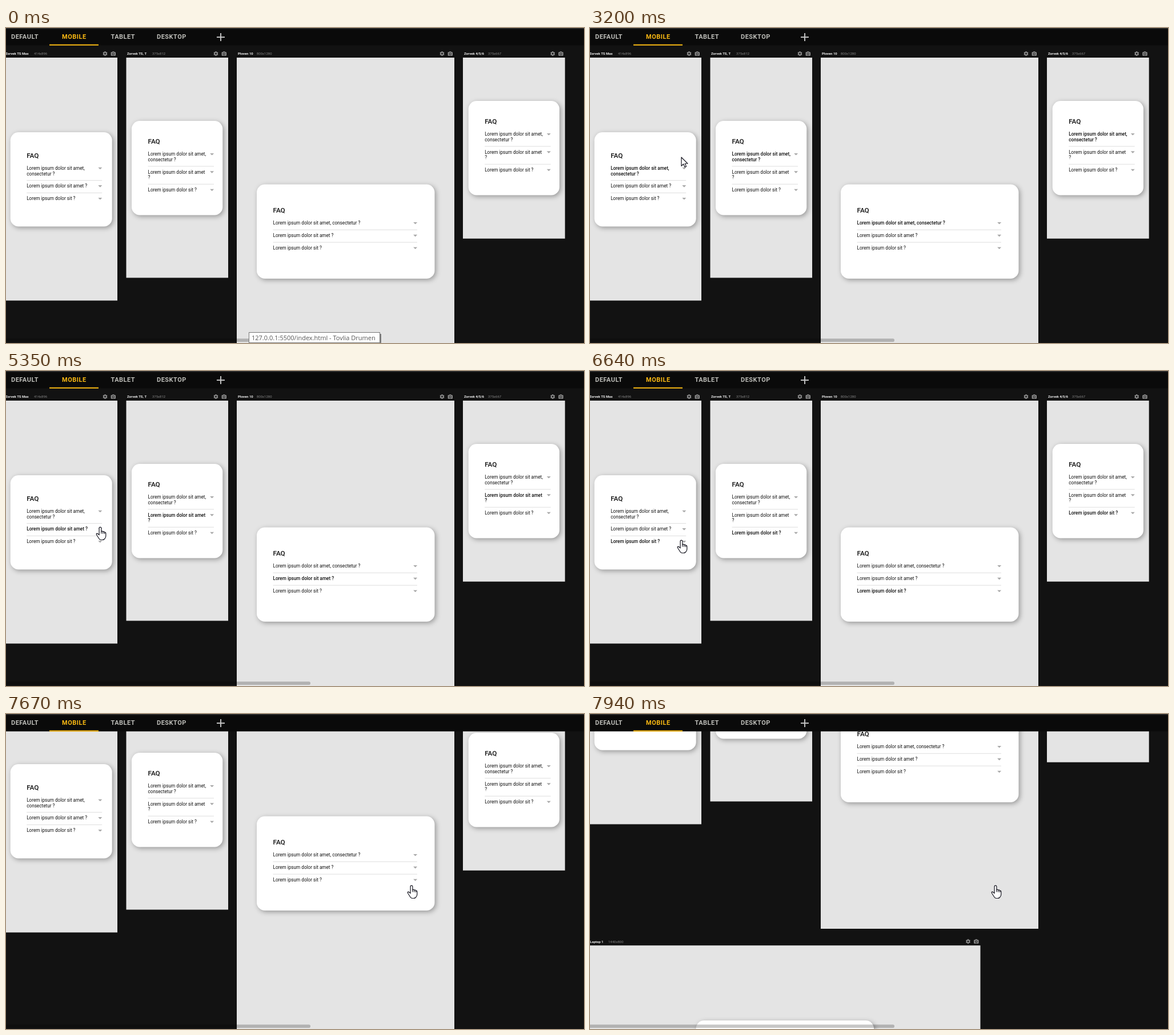
An HTML page with a canvas for the animation above (8000 ms loop, 1012 px wide and 553 px high).

```html
<!DOCTYPE html>
<html lang="en">
<head>
<meta charset="utf-8">
<title>FAQ accordion on several devices</title>
<style>
  html, body { margin: 0; width: 100%; height: 100%; overflow: hidden; background: #121212; }
  canvas { display: block; }
</style>
</head>
<body>
<canvas id="stage" width="1012" height="553"></canvas>
<script>
const ctx = document.getElementById('stage').getContext('2d');
const LOOP = 8000;
const LINE = 9.5;

const QUESTIONS = [
  'Lorem ipsum dolor sit amet, consectetur ?',
  'Lorem ipsum dolor sit amet ?',
  'Lorem ipsum dolor sit ?'
];
const ANSWER = 'Lorem ipsum dolor sit amet, consectetur adipiscing elit sed do.';

// Open and close time of each question; the heading stays bold a little longer.
const OPENINGS = [[2030, 3060], [4000, 5230], [6070, 6640]];
const BOLD_DELAY = 210;

// card: left, top, width, width of the rows
const DEVICES = [
  { name: 'Zorvek TS Max', size: '414x896', nameX: -1, sizeX: 49, x: -2, y: 52, w: 197, h: 426.5, card: [7.7, 183, 178, 132] },
  { name: 'Zorvek TS, T', size: '375x812', nameX: 212, sizeX: 256, x: 210.5, y: 52, w: 178.5, h: 386.5, card: [220, 163, 159.3, 115.5] },
  { name: 'Ploven 10', size: '800x1280', nameX: 406, sizeX: 439, x: 404, y: 52, w: 381, h: 610, card: [439, 274.5, 311.5, 252.5] },
  { name: 'Zorvek 4/5/6', size: '375x667', nameX: 802, sizeX: 844, x: 800, y: 52, w: 178.7, h: 317.7, card: [809.7, 128, 159.3, 115.5] },
  { name: 'Laptop 1', size: '1440x800', nameX: 0, sizeX: 32, x: -2, y: 691.3, w: 685.5, h: 381, card: [185.5, 823, 311.5, 252.5] }
];

const TABS = [['DEFAULT', 9], ['MOBILE', 98], ['TABLET', 183.5], ['DESKTOP', 264]];

// time, x, y
const POINTER = [
  [590, 724, 556], [1340, 171, 284], [1410, 169, 280], [1600, 155, 236], [1830, 160, 247],
  [1890, 160, 246], [2500, 160, 246], [2910, 160, 227], [3300, 160, 227],
  [3830, 165, 274], [5500, 165, 274], [5970, 155, 286], [6440, 155, 286],
  [6500, 160, 297], [6850, 160, 297], [7500, 710, 301]
];
const HAND_TIMES = [[1450, 3060], [3600, 6900], [7600, LOOP]];
const SCROLL = [[7530, 0], [7660, 95], [7740, 95], [7940, 285]];

const ARROW = new Path2D('M0 0V15.2L3.6 11.8L6 17.2L8.5 16.1L6.2 11H11Z');
const HAND = new Path2D(
  'M-1.9 2a1.9 1.9 0 0 1 3.8 0V7.6q1.6-1 2.9.6q1.7-.8 2.8.9q2.2-.3 2.2 2.1V15.5' +
  'q0 2.8-1.7 4.6q-1.4 2.4-4.4 2.4H1.4q-2.2 0-3.4-2L-6.3 13.7q-1.2-2.2.6-2.6q1.3-.1 3.8 2.7Z');
const KNUCKLES = new Path2D('M1.9 7.6v4M4.8 8.2v3.6M7.6 9.1v3');

const within = ([from, to], t) => t >= from && t < to;

function track(keys, t) {
  const next = keys.findIndex(key => key[0] > t);
  if (next < 0) return keys[keys.length - 1].slice(1);
  if (next === 0) return keys[0].slice(1);
  const a = keys[next - 1], b = keys[next];
  const part = (t - a[0]) / (b[0] - a[0]);
  return a.slice(1).map((v, i) => v + (b[i + 1] - v) * part);
}

function rect(x, y, w, h, color) {
  ctx.fillStyle = color;
  ctx.fillRect(x, y, w, h);
}

function roundRect(x, y, w, h, r, color) {
  ctx.fillStyle = color;
  ctx.beginPath();
  ctx.roundRect(x, y, w, h, r);
  ctx.fill();
}

function text(str, x, y, font, color) {
  ctx.font = font;
  ctx.fillStyle = color;
  ctx.fillText(str, x, y);
}

const roboto = (weight, size) => `${weight} ${size}px Roboto, sans-serif`;

function wrap(str, width, font) {
  ctx.font = font;
  const lines = [''];
  for (const word of str.split(' ')) {
    const last = lines.length - 1;
    const joined = lines[last] ? lines[last] + ' ' + word : word;
    if (ctx.measureText(joined).width <= width) lines[last] = joined;
    else lines.push(word);
  }
  return lines;
}

function disc(x, y, r, color) {
  ctx.fillStyle = color;
  ctx.beginPath();
  ctx.arc(x, y, r, 0, 7);
  ctx.fill();
}

function gear(x, y) {
  disc(x, y, 3, '#8c8c8c');
  for (let i = 0; i < 6; i++) {
    ctx.save();
    ctx.translate(x, y);
    ctx.rotate(i * Math.PI / 3);
    rect(-1.1, -4, 2.2, 2, '#8c8c8c');
    ctx.restore();
  }
  disc(x, y, 1.4, '#121212');
}

function camera(x, y) {
  roundRect(x - 4.2, y - 2.8, 8.4, 6.6, 1, '#8c8c8c');
  rect(x - 1.7, y - 3.8, 3.4, 1.5, '#8c8c8c');
  disc(x, y + 0.4, 2.2, '#121212');
  disc(x, y + 0.4, 1.3, '#8c8c8c');
}

function caret(x, y) {
  ctx.fillStyle = '#a9a9a9';
  ctx.beginPath();
  ctx.moveTo(x - 3.5, y - 1.8);
  ctx.lineTo(x + 3.5, y - 1.8);
  ctx.lineTo(x, y + 1.8);
  ctx.fill();
}

function drawCard([left, top, width, rowWidth], t) {
  ctx.save();
  ctx.shadowColor = 'rgba(0,0,0,.34)';
  ctx.shadowOffsetX = ctx.shadowOffsetY = 2.4;
  ctx.shadowBlur = 8;
  roundRect(left, top, width, 165.5, 14.3, '#fff');
  ctx.restore();

  const x = left + 28.5;
  const regular = roboto(400, 8.19);
  const answerFont = roboto(400, 7.6);
  const rows = QUESTIONS.map(q => wrap(q, rowWidth - 11, regular));
  const openIndex = OPENINGS.findIndex(span => within(span, t));
  const answer = openIndex < 0 ? [] : wrap(ANSWER, rowWidth, answerFont);
  const answerHeight = answer.length ? answer.length * LINE + 11 : 0;
  const lineCount = rows.flat().length;

  // The content is centred in a card of fixed height.
  let y = top + 45 - (lineCount - 3) * LINE / 2 - answerHeight / 2;
  text('FAQ', x, y + 4.3, roboto(500, 11.8), '#111');
  y += 22.9;

  rows.forEach((lines, i) => {
    const [opened, closed] = OPENINGS[i];
    const font = within([opened, closed + BOLD_DELAY], t) ? roboto(500, 8.19) : regular;
    caret(x + rowWidth - 3.4, y + 0.3);
    lines.forEach((line, n) => text(line, x, y + 2.9 + n * LINE, font, '#111'));
    y += (lines.length - 1) * LINE;
    if (i === openIndex) {
      answer.forEach((line, n) => text(line, x, y + 16 + n * LINE, answerFont, '#777'));
      y += answerHeight;
    }
    if (i < 2) rect(x, y + 11.4, rowWidth, 1, '#dedede');
    y += 21.9;
  });
}

function drawDevice(device, t) {
  const { x, y, w, h } = device;
  text(device.name, device.nameX, y - 4.6, roboto(700, 6), '#eee');
  text(device.size, device.sizeX, y - 4.6, roboto(400, 6), '#858585');
  gear(x + w - 21.5, y - 7);
  camera(x + w - 7.2, y - 7);
  rect(x, y, w, h, '#e4e4e4');
  drawCard(device.card, t);
}

function drawTabs() {
  rect(0, 0, 1012, 30.5, '#0a0a0a');
  rect(0, 0, 1012, 1.5, '#303030');
  ctx.letterSpacing = '0.5px';
  for (const [label, x] of TABS)
    text(label, x, 19.3, roboto(700, 11), label === 'MOBILE' ? '#fbba13' : '#bdbdb8');
  ctx.letterSpacing = '0px';
  rect(76, 28.7, 86, 2, '#fbba13');
  rect(369, 15.1, 14, 1.9, '#c8c8c8');
  rect(375.1, 9, 1.9, 14, '#c8c8c8');
}

function drawTooltip() {
  rect(428, 537, 229, 16, 'rgba(0,0,0,.45)');
  rect(425, 534, 230, 19, '#767676');
  rect(426, 535, 228, 17, '#fff');
  text('127.0.0.1:5500/index.html - Tovlia Drumen', 430, 547.5, '11px "Open Sans", sans-serif', '#575757');
}

function drawPointer(t) {
  const hand = HAND_TIMES.some(span => within(span, t));
  const shape = hand ? HAND : ARROW;
  ctx.save();
  ctx.translate(...track(POINTER, t));
  ctx.fillStyle = '#fff';
  ctx.strokeStyle = '#15151f';
  ctx.lineWidth = 1.2;
  ctx.lineJoin = 'round';
  ctx.fill(shape);
  ctx.stroke(shape);
  if (hand) ctx.stroke(KNUCKLES);
  ctx.restore();
}

function frame(now) {
  const t = now % LOOP;
  rect(0, 0, 1012, 553, '#121212');
  ctx.save();
  ctx.translate(0, -track(SCROLL, t)[0]);
  DEVICES.forEach(device => drawDevice(device, t));
  ctx.restore();
  roundRect(-4, 545.3, 537, 5.7, 2.8, 'rgba(0,0,0,.22)');
  drawTabs();
  if (t < 590) drawTooltip();
  else drawPointer(t);
  requestAnimationFrame(frame);
}
requestAnimationFrame(frame);
</script>
</body>
</html>
```
